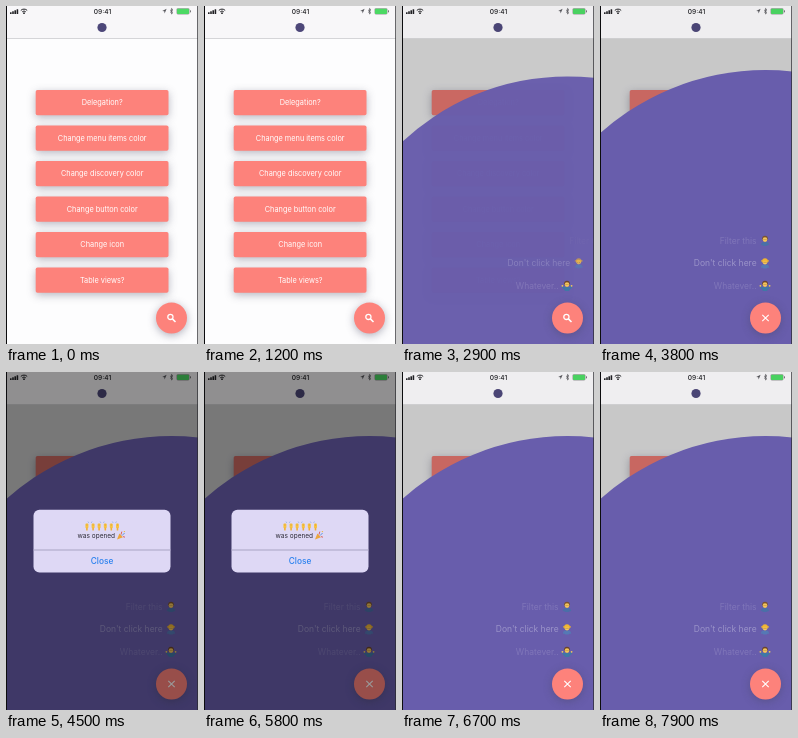
An HTML page with a canvas for the animation above (8000 ms loop, 192 by 338 pixels).

```html
<!DOCTYPE html>
<html lang="en">
<head>
<meta charset="utf-8">
<title>Discovery menu</title>
<style>
html, body { margin: 0; width: 100%; height: 100%; overflow: hidden; background: #fdfdfe; }
canvas { display: block; width: 192px; height: 338px; }
</style>
</head>
<body>
<canvas id="stage"></canvas>
<script>
const W = 192, H = 338, LOOP = 8000;
const canvas = document.getElementById('stage');
const c = canvas.getContext('2d');
const dpr = window.devicePixelRatio || 1;
canvas.width = W * dpr;
canvas.height = H * dpr;

const FONT = 'Inter, Roboto, sans-serif';
const CORAL = '#fd827b', PURPLE = '#685dac', INK = '#202024', SKIN = '#f5c65c';
const FAB = { x: 165.5, y: 312, r: 15.5 };
const LABELS = ['Delegation?', 'Change menu items color', 'Change discovery color',
  'Change button color', 'Change icon', 'Table views?'];
const ITEMS = [
  { text: 'Filter this', y: 234.5, start: 2860, ink: 0.2, hair: '#7a5230', shirt: '#4a6fa8' },
  { text: "Don't click here", y: 257, start: 2780, ink: 0.42, hair: '#f0b32e', shirt: '#5579b5', brim: true },
  { text: 'Whatever..', y: 279.5, start: 2700, ink: 0.2, hair: '#6b442c', shirt: '#3f78a6', shrug: true }
];

const clamp = v => Math.max(0, Math.min(1, v));
const span = (t, a, b) => clamp((t - a) / (b - a));
const smooth = v => v * v * (3 - 2 * v);
const outQuad = v => 1 - (1 - v) * (1 - v);

function rect(x, y, w, h, color, r = 0) {
  c.fillStyle = color;
  c.beginPath();
  c.roundRect(x, y, w, h, r);
  c.fill();
}

function disc(x, y, r, color) {
  c.fillStyle = color;
  c.beginPath();
  c.arc(x, y, r, 0, 7);
  c.fill();
}

function stroke(color, width, ...lines) {
  c.strokeStyle = color;
  c.lineWidth = width;
  c.beginPath();
  for (const [first, ...rest] of lines) {
    c.moveTo(...first);
    rest.forEach(p => c.lineTo(...p));
  }
  c.stroke();
}

function text(s, x, y, size, color, align = 'center', weight = 400) {
  c.font = `${weight} ${size}px ${FONT}`;
  c.textAlign = align;
  c.textBaseline = 'alphabetic';
  c.fillStyle = color;
  c.fillText(s, x, y + size * 0.36);
}

function shadow(blur, dy, alpha) {
  c.shadowColor = `rgba(70,70,95,${alpha})`;
  c.shadowBlur = blur * dpr;
  c.shadowOffsetY = dy * dpr;
}

function statusBar() {
  for (let i = 0; i < 4; i++) rect(4 + i * 2.2, 6.2 - i, 1.6, 1.8 + i, INK, 0.3);
  c.strokeStyle = INK;
  c.lineWidth = 1;
  for (const r of [2.5, 4.5]) {
    c.beginPath();
    c.arc(18, 7.6, r, -Math.PI * 0.75, -Math.PI * 0.25);
    c.stroke();
  }
  disc(18, 7.2, 0.9, INK);
  text('09:41', 96.5, 5.3, 6.6, INK, 'center', 500);
  c.fillStyle = '#55555a';
  c.beginPath();
  c.moveTo(160.6, 2.8);
  c.lineTo(156.2, 5);
  c.lineTo(158.3, 5.2);
  c.lineTo(158.6, 7.4);
  c.fill();
  stroke('#55555a', 0.7, [[164, 3.8], [167, 6.6], [165.5, 8], [165.5, 2.4], [167, 3.8], [164, 6.6]]);
  rect(170.5, 2.2, 13, 6.2, '#9a9a9c', 1.4);
  rect(171, 2.7, 12, 5.2, '#4cd964', 1);
  rect(184, 4.2, 1, 2.2, '#77777a', 0.4);
}

function page() {
  rect(0, 0, W, H, '#fdfdfe');
  rect(0, 0, W, 32.5, '#f8f7f9');
  rect(0, 32.2, W, 0.8, '#c9c8cc');
  statusBar();
  disc(96, 21.5, 4.6, '#4d4779');
  LABELS.forEach((s, i) => {
    const y = 84 + i * 35.5;
    c.save();
    shadow(8, 2.5, 0.38);
    rect(29.7, y, 132.8, 25.2, CORAL, 1.8);
    c.restore();
    text(s, 96.2, y + 12.7, 7.35, '#fff');
  });
}

function person(x, y, it) {
  const arms = it.shrug ? [[-4.6, 0.6], [-3.2, 3], [0, 2.6], [3.2, 3], [4.6, 0.6]]
    : [[-3.6, 4.6], [-2.6, 2.8], [2.6, 2.8], [3.6, 4.6]];
  c.save();
  c.translate(x, y);
  stroke(it.shirt, 1.6, arms);
  rect(-2.8, 1.6, 5.6, 3.8, it.shirt, 1.4);
  if (it.shrug) {
    disc(-4.6, 0.3, 0.9, SKIN);
    disc(4.6, 0.3, 0.9, SKIN);
  }
  disc(0, -2, 2.8, it.hair);
  disc(0, -0.9, 2.3, SKIN);
  if (it.brim) rect(-4, -2.7, 8, 1.2, it.hair, 0.6);
  rect(-1.3, -1.1, 0.7, 0.7, '#4b3422');
  rect(0.6, -1.1, 0.7, 0.7, '#4b3422');
  c.restore();
}

function menu(t) {
  const p = smooth(span(t, 2665, 2927));
  if (!p) return;
  rect(0, 0, W, 33, `rgba(0,0,0,${0.035 * p})`);
  rect(0, 33, W, H - 33, `rgba(0,0,0,${0.21 * p})`);
  c.globalAlpha = p;
  disc(FAB.x, FAB.y, FAB.r + (248 - FAB.r) * p, PURPLE);
  for (const it of ITEMS) {
    const q = span(t, it.start, it.start + 200);
    const dx = 75 * (1 - outQuad(q));
    c.globalAlpha = q;
    text(it.text, 156.6 + dx, it.y, 8.5, `rgba(225,222,240,${it.ink})`, 'right');
    person(165 + dx, it.y, it);
  }
  c.globalAlpha = 1;
}

function fab(t) {
  const k = smooth(span(t, 2920, 3080));
  c.save();
  shadow(8, 2, 0.42);
  disc(FAB.x, FAB.y, FAB.r, CORAL);
  c.restore();
  c.save();
  c.translate(FAB.x, FAB.y);
  c.globalAlpha = 1 - k;
  c.strokeStyle = '#fff';
  c.lineWidth = 1.3;
  c.beginPath();
  c.arc(-1.1, -1.1, 2.6, 0, 7);
  c.stroke();
  stroke('#fff', 1.6, [[0.9, 0.9], [4, 4]]);
  c.globalAlpha = k;
  stroke('#fff', 1.1, [[-3.2, -3.2], [3.2, 3.2]], [[3.2, -3.2], [-3.2, 3.2]]);
  c.restore();
}

function hands(x, y) {
  for (const s of [-1, 1]) {
    rect(x + s * 3.1 - 1.5, y - 2.4, 3, 4.6, '#f7c443', 1);
    rect(x + s * 3.1 - 0.8, y + 1.6, 1.6, 3, '#f0b03a', 0.5);
    stroke('#d9932f', 0.4, [[x + s * 3.1, y - 2.2], [x + s * 3.1, y]]);
  }
  stroke('#79a7dc', 0.7, [[x - 2, y - 4.4], [x - 1.3, y - 3.2]], [[x + 2, y - 4.4], [x + 1.3, y - 3.2]]);
}

function popper(x, y) {
  c.fillStyle = '#eda63b';
  c.beginPath();
  c.moveTo(x - 4, y + 4);
  c.lineTo(x - 1.6, y - 2);
  c.lineTo(x + 2, y + 1.6);
  c.fill();
  stroke('#d9534f', 0.9, [[x, y - 1], [x + 0.8, y - 4]], [[x + 2, y + 1], [x + 4, y + 1.6]]);
  stroke('#4d8fe0', 0.9, [[x + 1, y], [x + 3.6, y - 2.6]]);
  disc(x + 3.4, y - 4, 0.7, '#e8b93c');
}

function alertBox(t) {
  const open = smooth(span(t, 4050, 4400));
  const shown = open * (1 - smooth(span(t, 6140, 6480)));
  if (!shown) return;
  const dim = open * (1 - smooth(span(t, 6100, 6440)));
  rect(0, 0, W, H, `rgba(0,0,0,${0.4 * dim})`);
  const z = 1.15 - 0.15 * open;
  c.save();
  c.globalAlpha = shown;
  c.translate(96, 169);
  c.scale(z, z);
  c.translate(-96, -169);
  rect(27.5, 137.7, 137, 62.8, '#ded8f5', 6);
  rect(27.5, 177.6, 137, 0.8, '#aaa5c4');
  for (let i = 0; i < 3; i++) hands(84 + i * 12.2, 154);
  text('was opened', 90.3, 163.6, 6.5, '#2c2a36');
  popper(115, 163.6);
  text('Close', 96, 189.4, 8.3, '#2980ee', 'center', 500);
  c.restore();
}

function draw(t) {
  c.setTransform(dpr, 0, 0, dpr, 0, 0);
  c.globalAlpha = 1;
  page();
  menu(t);
  fab(t);
  alertBox(t);
  rect(0, 0, 1, H, '#0c0c0e');
  rect(W - 0.7, 0, 0.7, H, '#2a2a2e');
}

function tick() {
  draw(performance.now() % LOOP);
  requestAnimationFrame(tick);
}
tick();
</script>
</body>
</html>
```
